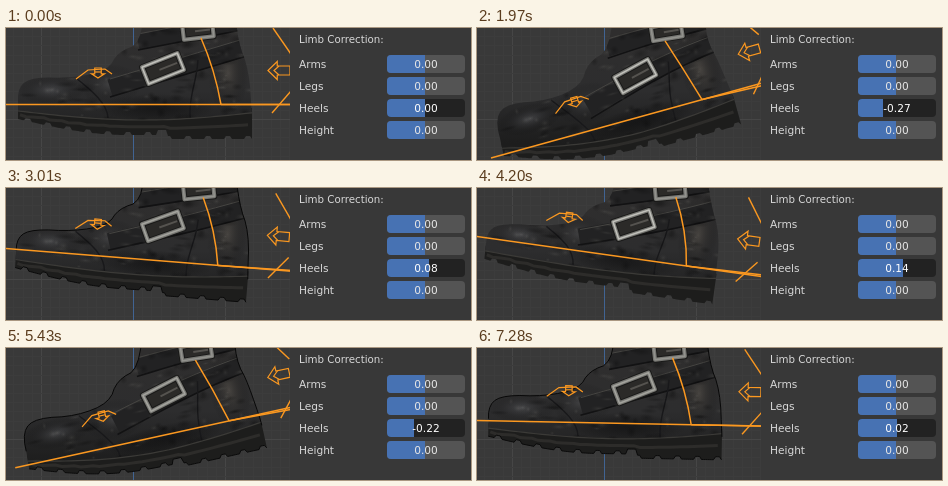
Animation of 465x132 px, one loop 7.38 s. Source, as an HTML page with a canvas:

```html
<!DOCTYPE html>
<html lang="en">
<head>
<meta charset="utf-8">
<title>Heel correction</title>
<style>
html, body { margin: 0; width: 100%; height: 100%; overflow: hidden; background: #393939; }
canvas { display: block; width: 465px; height: 132px; }
</style>
</head>
<body>
<canvas id="stage" width="465" height="132"></canvas>
<script>
const ctx = document.getElementById('stage').getContext('2d');
const LOOP = 7380, STEP = 78, VIEW = 284;
const ANKLE = [202, 37];
const ORANGE = '#fb9820';

// Slider drags: start, last step, value reached
const DRAGS = [
  [630, 1290, -0.27], [2310, 3010, 0.08], [3120, 3780, 0.14],
  [4560, 5220, -0.2], [5310, 6000, -0.28], [6760, 7280, 0.02]
];

const clamp = (v, lo, hi) => Math.max(lo, Math.min(hi, v));

function poseAt(t) {
  let value = 0, moving = false;
  for (const [start, end, goal] of DRAGS) {
    if (t < start) break;
    const steps = Math.round((end - start) / STEP) + 1;
    const done = Math.floor((t - start) / (end - start) * (steps - 1) + 1e-6) + 1;
    value += (goal - value) * Math.min(1, done / steps);
    moving = t < end + 110;
  }
  return { value, moving };
}

let angle = 0;

function rotate([x, y], a) {
  const dx = x - ANKLE[0], dy = y - ANKLE[1], c = Math.cos(a), s = Math.sin(a);
  return [ANKLE[0] + dx * c - dy * s, ANKLE[1] + dx * s + dy * c];
}

// The shaft stays with the shin, the toe lags behind the foot
const weight = ([x, y]) => clamp((y + 20) / 95, 0.1, 1) * clamp(0.75 + (x - 15) / 540, 0.75, 1);
const bend = p => rotate(p, angle * weight(p));
const rigid = p => rotate(p, angle);

function trace(pts, map, closed) {
  ctx.beginPath();
  pts.forEach(p => ctx.lineTo(...map(p)));
  if (closed) ctx.closePath();
}

function stroke(pts, color, width, map = bend, closed = false) {
  trace(pts, map, closed);
  ctx.strokeStyle = color;
  ctx.lineWidth = width;
  ctx.stroke();
}

function fill(pts, color) {
  trace(pts, bend, true);
  ctx.fillStyle = color;
  ctx.fill();
}

function range(from, to, step, fn) {
  const out = [];
  for (let x = from; x <= to; x += step) out.push(fn(x));
  return out;
}

// Rounds a few key points into a curve
function smooth(pts) {
  let out = pts;
  for (let n = 0; n < 2; n++) {
    out = out.flatMap(([x, y], i) => {
      const [u, v] = out[i + 1] || [x, y];
      return [[x * 0.75 + u * 0.25, y * 0.75 + v * 0.25], [x * 0.25 + u * 0.75, y * 0.25 + v * 0.75]];
    });
  }
  return out;
}

const welt = x => 83 + 9 * Math.sin(Math.PI * (x - 12) / 250);

function tread(x) {
  const notch = x % 20 < 5 ? 3 : 0;
  if (x > 161) return 111 - notch;
  if (x > 150) return 102;
  return 91 + 16 * Math.sin(clamp((x - 12) / 110, 0, 1) * Math.PI / 2) - notch;
}

const TOP = smooth([
  [12, 83], [12, 58], [28, 49], [68, 50], [102, 42], [112, 24], [135, 15], [138, -30],
  [228, -30], [232, 14], [243, 42], [246, 88]
]);
const WELT = range(12, 246, 6, x => [x, welt(x)]);
const UPPER = [...TOP, ...WELT.slice().reverse()];
const TREADS = range(12, 246, 2, x => [x, tread(x)]);
const SOLE = [[12, 78], ...TREADS, [246, 80]];

function seeded(seed) {
  return () => (seed = (seed * 16807) % 2147483647) / 2147483647;
}

function glow(x, y, rx, ry, color) {
  const [cx, cy] = bend([x, y]);
  ctx.save();
  ctx.translate(cx, cy);
  ctx.rotate(angle);
  ctx.scale(rx, ry);
  const g = ctx.createRadialGradient(0, 0, 0, 0, 0, 1);
  g.addColorStop(0, color);
  g.addColorStop(1, 'transparent');
  ctx.fillStyle = g;
  ctx.fillRect(-1, -1, 2, 2);
  ctx.restore();
}

function grain() {
  const rnd = seeded(41);
  for (let i = 0; i < 150; i++) {
    const tone = rnd() > 0.5 ? 'rgba(150,148,140,.14)' : 'rgba(0,0,0,.24)';
    glow(14 + rnd() * 230, rnd() * 95, 3 + rnd() * 9, 2 + rnd() * 4, tone);
  }
}

function strap(x0, y0, x1, y1, width) {
  const edge = d => range(0, 1, 0.125, k => [x0 + (x1 - x0) * k, y0 + (y1 - y0) * k + d]);
  stroke(edge(0), '#222223', width);
  stroke(edge(-width / 2), '#464542', 1);
  stroke(edge(width / 2), '#121213', 1.6);
}

// A stiff metal frame that turns with the leather below it
function buckle(x, y, w, h, tilt, light) {
  ctx.save();
  ctx.translate(...bend([x, y]));
  ctx.rotate(tilt + angle * weight([x, y]) * 0.7);
  ctx.lineJoin = 'round';
  ctx.fillStyle = '#2b2a28';
  ctx.fillRect(-w, -h, 2 * w, 2 * h);
  for (const [color, width] of [['#191918', 6], ['#777773', 4], [light, 1.6]]) {
    ctx.strokeStyle = color;
    ctx.lineWidth = width;
    ctx.strokeRect(-w, -h, 2 * w, 2 * h);
  }
  ctx.fillStyle = '#55534f';
  ctx.fillRect(-w * 0.2, -1, w, 2);
  ctx.restore();
}

function drawBoot(moving) {
  fill(SOLE, '#1d1d1c');
  const shade = ctx.createLinearGradient(0, 10, 0, 115);
  shade.addColorStop(0, '#2f2e2e');
  shade.addColorStop(0.5, '#2d2d2e');
  shade.addColorStop(1, '#1d1d1d');
  fill(UPPER, shade);

  ctx.save();
  trace(UPPER, bend, true);
  ctx.clip();
  glow(45, 62, 34, 15, 'rgba(90,91,95,.6)');
  glow(104, 56, 32, 20, 'rgba(86,86,88,.5)');
  glow(222, 45, 20, 42, 'rgba(98,92,84,.5)');
  glow(150, 80, 60, 14, 'rgba(8,8,9,.5)');
  strap(104, 60, 244, 18, 18);
  strap(132, 14, 236, -6, 16);
  stroke(range(0, 40, 5, y => [70 + 32 * Math.sin(y / 26), 50 + y]), '#18181a', 1.4);
  stroke(range(32, 92, 6, y => [188 + 4 * Math.sin(y / 18), y]), '#18181a', 1.4);
  grain();
  ctx.restore();

  stroke(WELT, '#3b3a37', 1.2);
  stroke(range(14, 244, 6, x => [x, welt(x) * 0.55 + tread(x - x % 20 + 8) * 0.45]), '#2d2c2a', 3);

  buckle(157, 40.5, 19, 9, -0.38, moving ? '#a3a39d' : '#c0c0ba');
  buckle(192, 3, 15, 7, -0.12, '#92928d');

  if (moving) {
    stroke(TOP, '#080808', 1);
    stroke(TREADS, '#0a0a0a', 1);
  }
}

function drawGrid() {
  const line = (x, y, w, h, color) => {
    ctx.fillStyle = color;
    ctx.fillRect(Math.round(x), Math.round(y), w, h);
  };
  line(0, 0, VIEW, 132, '#393939');
  for (let i = -13; i < 18; i++) line(127 + i * 9.2, 0, 1, 132, i % 10 ? '#3c3c3c' : '#464646');
  for (let i = -9; i < 5; i++) line(0, 91 + i * 9.2, VIEW, 1, i % 10 ? '#3c3c3c' : '#464646');
  line(127, 0, 1, 132, '#416493');
}

function drawRig() {
  const line = (pts, closed, width = 1.2) => stroke(pts, ORANGE, width, rigid, closed);
  const heel = [215, 76.5];
  line([[-4, 76.5], [330, 76.5]], false, 1.5);
  trace([rigid(heel), rotate([330, 76.5], angle * 0.86)], p => p);
  ctx.stroke();

  // The shin arc straightens as the heel rises
  ctx.beginPath();
  ctx.moveTo(...rigid([195, 10]));
  ctx.quadraticCurveTo(...rigid([209 + 14 * angle, 42]), ...rigid(heel));
  ctx.stroke();

  // Arrow along its own axis: tip first, then one side mirrored
  const arrow = (x, y, len, wide, down) => {
    const side = [[len * 0.42, wide], [len * 0.42, wide * 0.5], [len, wide * 0.5]];
    const pts = [[0, 0], ...side, ...side.map(([a, b]) => [a, -b]).reverse()];
    line(pts.map(([a, b]) => down ? [x + b, y - a] : [x + a, y + b]), true);
  };
  arrow(92, 50, 10, 6.5, true);
  line([[70, 51], [82, 42], [99, 41], [106, 46]]);
  line([[89, 44], [95, 44]]);
  arrow(262, 42.5, 22, 9, false);
  line([[273, 38], [268, 42.5], [273, 47]]);
  line([[267, 0], [287, 29]], false, 1.4);
  line([[266, 85], [285, 63]], false, 1.4);
}

function label(text, x, y, align, color = '#d8d8d8', size = 10.6) {
  ctx.font = `${size}px "DejaVu Sans", sans-serif`;
  ctx.textAlign = align;
  ctx.fillStyle = color;
  ctx.fillText(text, x, y);
}

function slider(name, value, y, active) {
  label(name, 293, y + 4, 'left');
  ctx.save();
  ctx.beginPath();
  ctx.roundRect(381, y - 9, 78, 18, 4);
  ctx.clip();
  ctx.fillStyle = active ? '#222222' : '#545454';
  ctx.fillRect(381, y - 9, 78, 18);
  ctx.fillStyle = '#4772b3';
  ctx.fillRect(381, y - 9, Math.round(38 + value * 50), 18);
  ctx.restore();
  label(value.toFixed(2), 420, y + 4, 'center', active ? '#ffffff' : '#e6e6e6');
}

function drawPanel(value) {
  ctx.fillStyle = '#383838';
  ctx.fillRect(VIEW, 0, 181, 132);
  label('Limb Correction:', 293, 15, 'left', '#d8d8d8', 10.25);
  ['Arms', 'Legs', 'Heels', 'Height'].forEach((name, i) => {
    const active = name === 'Heels';
    slider(name, active ? value : 0, 36 + i * 22, active);
  });
}

function render(t) {
  const { value, moving } = poseAt(t);
  angle = value;
  drawGrid();
  drawBoot(moving);
  drawRig();
  drawPanel(value);
}

function loop() {
  render(performance.now() % LOOP);
  requestAnimationFrame(loop);
}
loop();
</script>
</body>
</html>
```
